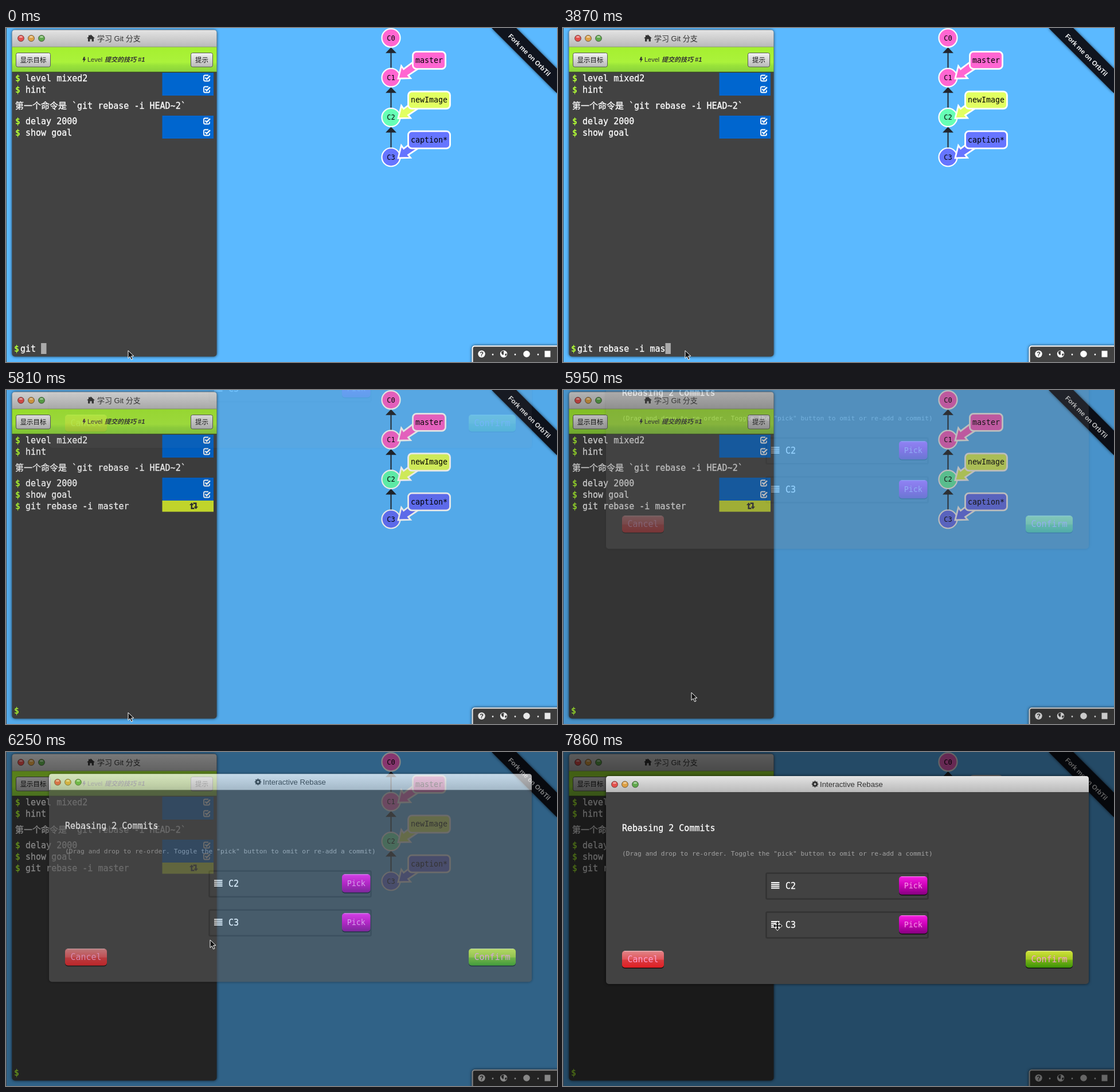
Animation of 961x583 px, one loop 8000 ms. Source, as an HTML page:

```html
<!DOCTYPE html>
<html lang="zh">
<head>
<meta charset="utf-8">
<title>Interactive rebase</title>
<style>
  html, body { margin: 0; width: 100%; height: 100%; overflow: hidden; background: #5bb9ff; }
  svg { display: block; width: 100%; height: 100%; }
  text { white-space: pre; }
  .mono { font-family: "DejaVu Sans Mono", "Noto Sans CJK SC", "Noto Sans CJK", monospace; font-size: 15px; fill: #fff; }
  .mono:not(.prompt):not([style]) { stroke: #fff; stroke-width: .3; }
  .sans { font-family: "Liberation Sans", "Noto Sans CJK SC", "Noto Sans CJK", sans-serif; font-size: 13px; fill: #333; }
  .prompt { fill: #b0fb35; font-weight: bold; }
  .mid { text-anchor: middle; }
  .shadow { filter: drop-shadow(0 0 2.5px rgba(0, 0, 0, .7)); }
</style>
</head>
<body>
<svg viewBox="0 0 961 583" preserveAspectRatio="none">
  <defs>
    <linearGradient id="chrome" x2="0" y2="1"><stop stop-color="#e4e4e4"/><stop offset="1" stop-color="#b9b9b9"/></linearGradient>
    <linearGradient id="lime" x2="0" y2="1"><stop stop-color="#a5f02f"/><stop offset=".6" stop-color="#abf23b"/><stop offset=".75" stop-color="#98e23a"/><stop offset="1" stop-color="#8bd23c"/></linearGradient>
    <linearGradient id="silver" x2="0" y2="1"><stop stop-color="#f2f2f2"/><stop offset="1" stop-color="#b9b9b9"/></linearGradient>
    <linearGradient id="magenta" x2="0" y2="1"><stop stop-color="#f51fe0"/><stop offset=".5" stop-color="#cc00b8"/><stop offset="1" stop-color="#85007f"/></linearGradient>
    <linearGradient id="red" x2="0" y2="1"><stop stop-color="#e0868a"/><stop offset=".5" stop-color="#e2555a"/><stop offset=".55" stop-color="#d93a3e"/><stop offset="1" stop-color="#e01f24"/></linearGradient>
    <linearGradient id="green" x2="0" y2="1"><stop stop-color="#cfe23a"/><stop offset=".5" stop-color="#a3c721"/><stop offset=".55" stop-color="#78b315"/><stop offset="1" stop-color="#3d9408"/></linearGradient>
  </defs>
  <rect width="961" height="583" fill="#5bb9ff"/>
  <g id="tree"></g>
  <g id="ribbon"></g>
  <g id="tools"></g>
  <g id="term"></g>
  <g id="veil">
    <rect width="961" height="583" fill="#000" opacity=".6"/>
    <g id="modal"></g>
  </g>
  <rect width="1" height="583" fill="#45474d"/>
  <g id="arrow"><path d="M0 0V13.5L3.2 10.6 5.6 16 8 15 5.6 9.7H10Z" fill="#111" stroke="#fff"/></g>
  <g id="move"><path d="M0-7.5 3-4H1.1V-1.1H4V-3L7.5 0 4 3V1.1H1.1V4H3L0 7.5-3 4H-1.1V1.1H-4V3L-7.5 0-4-3V-1.1H-1.1V-4H-3Z" fill="#111" stroke="#fff" stroke-width="1.6" paint-order="stroke"/></g>
</svg>
<script>
const NS = 'http://www.w3.org/2000/svg';
const $ = id => document.getElementById(id);

function add(parent, tag, attrs, content) {
  const el = document.createElementNS(NS, tag);
  for (const k in attrs) el.setAttribute(k, attrs[k]);
  if (content) el.textContent = content;
  return parent.appendChild(el);
}
const box = (p, x, y, width, height, fill, more) => add(p, 'rect', { x, y, width, height, fill, ...more });
const path = (p, d, fill, more) => add(p, 'path', { d, fill, ...more });
const dot = (p, cx, cy, r, fill, more) => add(p, 'circle', { cx, cy, r, fill, ...more });
const mono = (p, x, y, s, more) => add(p, 'text', { x, y, class: 'mono', ...more }, s);
const sans = (p, x, y, s, more) => add(p, 'text', { x, y, class: 'sans', ...more }, s);
const at = (p, x, y) => add(p, 'g', { transform: `translate(${x} ${y})` });

function lights(p, x, y) {
  ['#e2504c', '#dda045', '#5fa84c'].forEach((c, i) => {
    dot(p, x + 18 * i, y, 5.5, c, { stroke: '#000', 'stroke-opacity': .45 });
    add(p, 'ellipse', { cx: x + 18 * i, cy: y - 2.5, rx: 3, ry: 1.6, fill: '#fff', opacity: .5 });
  });
}

function frame(p, x, y, w, h, bar) {
  box(p, x, y, w, h, '#424242', { rx: 5, class: 'shadow' });
  path(p, `M${x} ${y + bar}v${5 - bar}q0-5 5-5h${w - 10}q5 0 5 5v${bar - 5}z`, 'url(#chrome)');
}

function button(p, x, y, w, h, fill, label, size, color) {
  box(p, x, y + 1.5, w, h, '#111', { rx: 5 });
  box(p, x, y, w, h, `url(#${fill})`, { rx: 5 });
  path(p, `M${x + 4} ${y + .7}h${w - 8}`, 'none', { stroke: '#fff', 'stroke-opacity': .5 });
  mono(p, x + w / 2, y + h / 2 + 5, label, { class: 'mono mid', style: `font-size:${size}px;fill:${color}` });
}

function buildTree() {
  const g = $('tree'), x = 671.5, gap = 69.4;
  const pink = '#ff66d1', violet = '#6675ff', mint = '#66ffb5';
  const cy = i => 17.3 + gap * i;
  for (let i = 1; i < 4; i++) {
    const tip = cy(i - 1) + 16.5;
    path(g, `M${x} ${tip + 6}V${cy(i) - 16}`, 'none', { stroke: '#22272e', 'stroke-width': 2 });
    path(g, `M${x} ${tip}l9.5 10h-19z`, '#22272e');
  }
  [pink, pink, mint, violet].forEach((c, i) => {
    dot(g, x, cy(i), 16, c, { stroke: '#fff', 'stroke-width': 2.2 });
    mono(g, x, cy(i) + 4.3, 'C' + i, { class: 'mono mid', style: 'font-size:12px;fill:#000' });
  });
  [['master', 57, pink], ['newImage', 73, '#e2ff62'], ['caption*', 73, violet]].forEach(([s, w, c], i) => {
    const y = cy(i + 1), line = { stroke: '#fff', 'stroke-width': 2.8 };
    path(at(g, 0, y), 'M684 1.5 689.5-20.5 693.5-15 711-28 721-17 701.5-4 705.5 1Z', c, line);
    box(g, 738 - w / 2, y - 45.3, w, 30, c, { rx: 6.5, ...line });
    mono(g, 738, y - 26, s, { class: 'mono mid', style: 'font-size:13.3px;fill:#000' });
  });
}

function buildRibbon() {
  const g = $('ribbon');
  path(g, 'M847 0H890L961 71V114Z', '#10141e', { class: 'shadow' });
  const t = add(g, 'g', { transform: 'translate(913 47) rotate(45)' });
  sans(t, 0, 4, 'Fork me on OrbTil', { class: 'sans mid', style: 'font-size:11.5px;font-weight:bold;fill:#f0f1f3' });
}

function buildTools() {
  const g = $('tools');
  box(g, 813.5, 555.3, 160, 40, '#424242', { rx: 4, stroke: '#fff', 'stroke-width': 2, class: 'shadow' });
  dot(g, 829.5, 569, 6.2, '#fff');
  sans(g, 829.5, 573, '?', { class: 'sans mid', style: 'font-size:11px;font-weight:bold' });
  dot(g, 868, 569, 6.2, '#fff');
  path(g, 'M864 565l3-1.5 2 1.5-1.5 2 1 2-2 2-2.5-3zM870 569l3-1 .5 2-2.5 3z', '#424242');
  for (const x of [849, 888, 928]) dot(g, x, 570, 1.4, '#fff');
  dot(g, 908, 569, 5.8, '#fff');
  box(g, 939.5, 563.5, 10, 11, '#fff');
}

function command(p, y, s) {
  mono(p, 16, y, '$', { class: 'mono prompt' });
  mono(p, 34, y, s);
}

function checked(p, y) {
  box(p, 272.5, y, 89.5, 20, '#0066cf');
  const g = at(p, 350, y + 9.5), pen = { stroke: '#fff', 'stroke-width': 1.8 };
  path(g, 'M5 1V3Q5 5 3 5H-3Q-5 5-5 3V-3Q-5-5-3-5H3', 'none', pen);
  path(g, 'M-2.5-1 0 1.7 6-4.2', 'none', { ...pen, 'stroke-width': 2.4 });
}

let typed, block, pending;

function buildTerm() {
  const g = $('term');
  frame(g, 10.5, 3.5, 357, 570, 29.5);
  lights(g, 26, 18);
  path(g, 'M148 11.5 155 18H153V23.5H149.6V19.5H146.4V23.5H143V18H141L144 15.2V12.5H146V13.4Z', '#333');
  sans(g, 159, 22.5, '学习 Git 分支');

  box(g, 10.5, 33, 357, 44, 'url(#lime)');
  path(g, 'M10.5 33h357', 'none', { stroke: '#8a9a75' });
  path(g, 'M10.5 77h357', 'none', { stroke: '#2c3a1c', 'stroke-width': 1.2 });
  for (const [x, w, s] of [[17, 61, '显示目标'], [322, 39, '提示']]) {
    box(g, x + .5, 43.5, w - 1, 24.5, 'url(#silver)', { rx: 3, stroke: '#565c50' });
    sans(g, x + w / 2, 59.5, s, { class: 'sans mid', style: 'font-size:11.4px;fill:#111' });
  }
  path(g, 'M135.5 50.5H138L137 53.8H139.3L134.8 60.5 135.8 56H133.5Z', '#333');
  sans(g, 142, 59, 'Level', { style: 'font-size:11px' });
  sans(g, 172, 59, '提交的技巧 #1', { style: 'font-size:11px;font-weight:bold;font-style:italic' });

  [78, 98, 153, 173].forEach(y => checked(g, y));
  command(g, 93, 'level mixed2');
  command(g, 113, 'hint');
  mono(g, 16, 141, '第一个命令是 `git rebase -i HEAD~2`');
  command(g, 168, 'delay 2000');
  command(g, 188, 'show goal');

  pending = add(g, 'g', {});
  command(pending, 208, 'git rebase -i master');
  box(pending, 272.5, 193, 89.5, 19.5, '#d3e930');
  for (const turn of [0, 180]) {
    const half = add(pending, 'g', { transform: `translate(327.5 202.3) rotate(${turn})` });
    path(half, 'M-7.5-1.3-3.7-5.7 0-1.3H-2.5V3.2H1V5.7H-5V-1.3Z', '#333');
  }

  mono(g, 14, 565, '$', { class: 'mono prompt' });
  typed = mono(g, 25, 565, '');
  block = box(g, 61, 550, 9.4, 19, '#aaa');
}

function buildModal() {
  const g = $('modal');
  frame(g, 75, 42, 842, 363, 28);
  lights(g, 90, 56.5);
  const gear = at(g, 439.5, 56);
  dot(gear, 0, 0, 3, 'none', { stroke: '#333', 'stroke-width': 2.6 });
  for (let a = 0; a < 360; a += 45) box(gear, -1.2, -5.6, 2.4, 2.4, '#333', { transform: `rotate(${a})` });
  sans(g, 448, 61, 'Interactive Rebase', { style: 'font-size:13.2px' });
  mono(g, 103, 138, 'Rebasing 2 Commits');
  mono(g, 103, 181, '(Drag and drop to re-order. Toggle the "pick" button to omit or re-add a commit)',
    { style: 'font-size:11.25px;fill:#a3a3a3' });
  ['C2', 'C3'].forEach((s, i) => {
    const r = at(g, 0, 68 * i);
    box(r, 354.5, 211.5, 282, 45, '#424242', { rx: 2, stroke: '#333', 'stroke-width': 2.6 });
    for (let y = 227; y < 239; y += 3.2) box(r, 363, y, 14.5, 2, '#fff');
    mono(r, 388, 238.5, s);
    button(r, 586, 217, 49.5, 32, 'magenta', 'Pick', 13.4, '#f79be6');
  });
  button(g, 103, 347, 73, 29.5, 'red', 'Cancel', 15, '#ff9fd0');
  button(g, 807, 347, 82, 29.5, 'green', 'Confirm', 15, '#f79fd0');
}

const LOOP = 8000, ENTER = 5360, HOVER = 6400;
const COMMAND = 'git rebase -i master';
// [time, characters on the prompt]
const KEYS = [[0, 4], [300, 6], [590, 7], [740, 8], [1040, 9], [1190, 10], [1630, 11], [1930, 12],
  [2820, 13], [3270, 14], [3570, 15], [3720, 16], [3870, 17], [4170, 18], [4470, 20]];
const STEPS = [0, 5810, 5950, 6100, 6250, 6400, 6550, 6700, 6840, 6980, 7130, 7280, 7420, 7570, 7720, 7860];
// [time, x, y] of the pointer
const MOUSE = [[0, 213, 563], [5810, 213, 563], [5950, 224, 528], [6100, 276, 404], [6250, 356, 328],
  [6400, 423, 280.5], [6550, 412, 286], [6840, 393, 297], [7420, 378, 304], [7860, 374, 303.5]];

function pointer(t) {
  const i = MOUSE.findIndex(k => k[0] > t);
  if (i < 0) return MOUSE[MOUSE.length - 1].slice(1);
  const [t0, x0, y0] = MOUSE[i - 1], [t1, x1, y1] = MOUSE[i];
  const k = (t - t0) / (t1 - t0);
  return [x0 + (x1 - x0) * k, y0 + (y1 - y0) * k];
}

function draw(t) {
  const entered = t >= ENTER;
  const count = KEYS.filter(k => k[0] <= t).pop()[1];
  typed.textContent = entered ? '' : COMMAND.slice(0, count);
  block.setAttribute('x', 25 + count * 9.03);
  block.style.display = entered ? 'none' : '';
  pending.style.display = entered ? '' : 'none';

  const held = STEPS.filter(s => s <= t).pop();
  const p = Math.min(1, Math.max(0, (held - 5712) / 688));
  $('veil').style.display = p ? '' : 'none';
  $('veil').setAttribute('opacity', p);
  $('modal').setAttribute('transform', `translate(0 ${-497 * (1 - p) ** 3.2})`);

  const spot = `translate(${pointer(held)})`, over = held >= HOVER;
  $('arrow').setAttribute('transform', spot);
  $('move').setAttribute('transform', spot);
  $('arrow').style.display = over ? 'none' : '';
  $('move').style.display = over ? '' : 'none';
}

buildTree();
buildRibbon();
buildTools();
buildTerm();
buildModal();

const start = performance.now();
function tick() {
  draw((performance.now() - start) % LOOP);
  requestAnimationFrame(tick);
}
tick();
</script>
</body>
</html>
```
